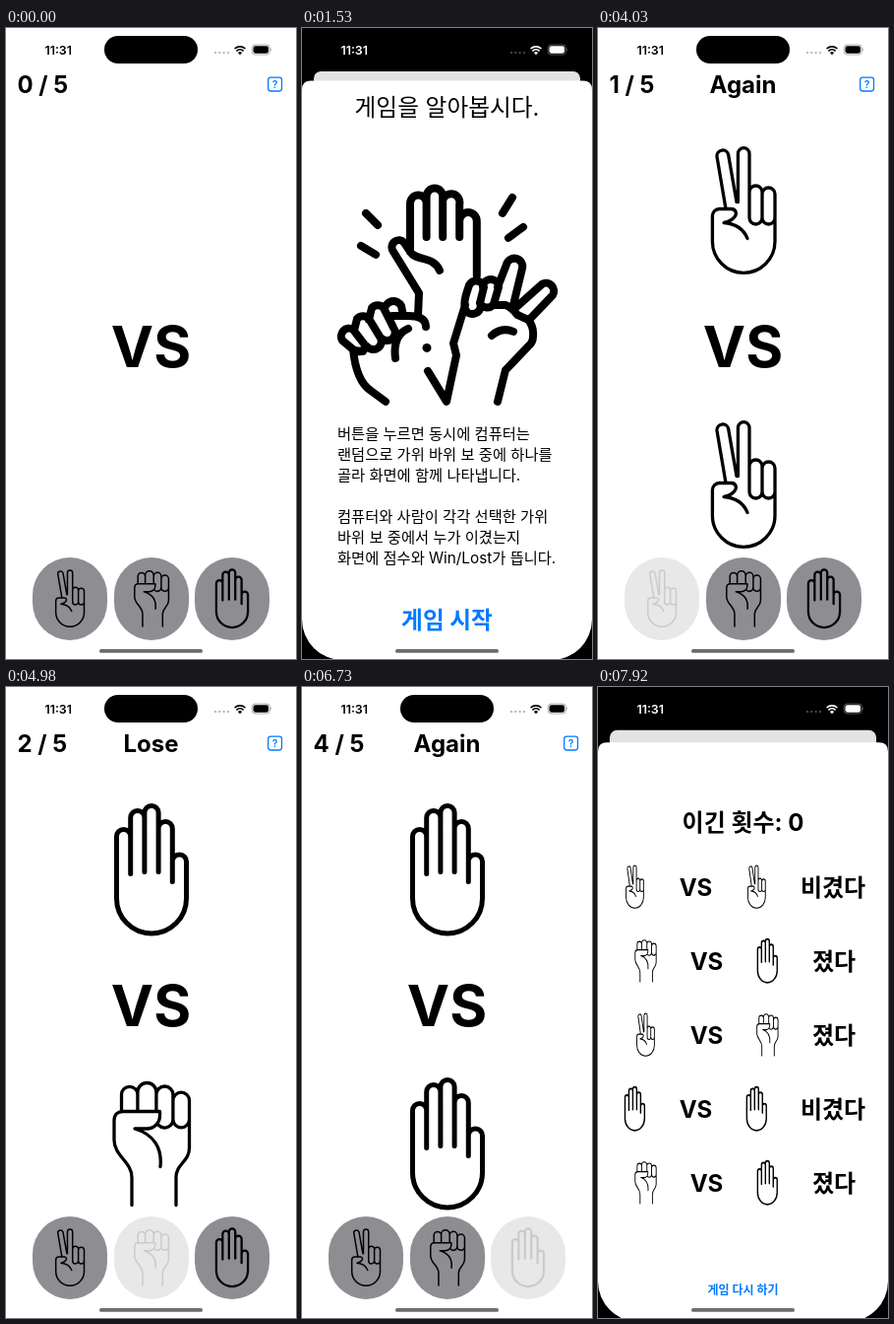
An HTML page for the animation above (8000 ms loop, 295x640 px).

```html
<!DOCTYPE html>
<html lang="ko">
<head>
<meta charset="utf-8">
<title>Rock paper scissors</title>
<style>
html, body { margin: 0; width: 100%; height: 100%; overflow: hidden; background: #000; }
svg { display: block; width: 100%; height: 100%; }
text { font-family: Inter, "Noto Sans CJK KR", "Noto Sans CJK", "Noto Sans CJK JP", sans-serif; white-space: pre; }
.mid { text-anchor: middle; }
.bold { font-weight: 700; }
.big { font-size: 24px; }
.blue { fill: #007aff; }
.line { fill: none; stroke: #000; stroke-linecap: round; stroke-linejoin: round; }
</style>
</head>
<body>
<svg viewBox="0 0 295 640">
  <defs>
    <path id="hand0" class="line" stroke-width="3.3" d="M-5.6-9V-58a5.8 5.8 0 0 1 11.6 0V5
      M-18-2L-27-55a5.9 5.9 0 0 1 11.6-2L-7-9
      M6-19a6.5 6.5 0 0 1 13 0V7a6.5 6.5 0 0 1-13 0z
      M19-17a6.5 6.5 0 0 1 13 0V7a6.5 6.5 0 0 1-13 0
      M32 7V31a31.8 31.8 0 0 1-63.6 0V5a7 7 0 0 1 7-7H-12.5c5 0 6 5 3.5 8-3 4-6 5-11 6c12 1 20 6 24 16"/>
    <path id="hand1" class="line" stroke-width="3.3" d="M-30.5-33V-50a8.2 8.2 0 0 1 16.4 0V-33
      M-14.1-50V-52.5a9.5 9.5 0 0 1 19 0V-33
      M4.9-50a8.5 8.5 0 0 1 17 0V-25a8.5 8.5 0 0 1-14.5 6
      M21.9-44a8.3 8.3 0 0 1 16.6 0V-25a8.3 8.3 0 0 1-16.6 0
      M38.5-25V4c0 14-13.5 16-13.5 30V62
      M-20 62V34c0-16-18-22-18-38V-24c0-6 4-9 9-9H8.5V-29c0 8-6 13.5-13.5 13.5H-17C2-10 11 4 9 23"/>
    <path id="hand2" class="line" stroke-width="5" d="M-21.3 4V-34a7.1 7.1 0 0 0-14.2 0V29a35.5 35.5 0 0 0 71 0V-8.5a7.1 7.1 0 0 0-14.2 0V12
      M-21.3-34V-53a7.1 7.1 0 0 1 14.2 0V2
      M-7.1-53V-58a7.1 7.1 0 0 1 14.2 0V2
      M7.1-42a7.1 7.1 0 0 1 14.2 0V-8"/>
  </defs>

  <g id="game">
    <rect class="page" width="295" height="640" fill="#fff"/>
    <text id="score" class="big bold" x="11.5" y="65.7"></text>
    <text id="verdict" class="big bold mid" x="147.5" y="65.7"></text>
    <g id="help">
      <rect x="266.7" y="50.2" width="13.8" height="13.8" rx="2.4" fill="none" stroke="#007aff" stroke-width="1.3"/>
      <text class="mid blue" x="273.6" y="60.9" font-size="10.5" font-weight="600">?</text>
    </g>
    <use id="cpu" transform="translate(148 185.5)"/>
    <text class="bold mid" x="147.5" y="344.2" font-size="58">VS</text>
    <use id="me" transform="translate(148 463.5)"/>
    <g id="buttons"></g>
    <rect id="dim" class="page" width="295" height="640"/>
  </g>

  <g id="rules">
    <path class="sheet" fill="#fff"/>
    <text class="mid" x="147.5" y="88" font-size="23.7">게임을 알아봅시다.</text>
    <path class="line" stroke-width="8" d="M65 187l12 12M60 220l15 9M214 171l-10 16M225 201l-15 11
      M110 226V177a8.3 8.3 0 0 1 16.6 0V211
      M126.6 177V170a8.3 8.3 0 0 1 16.6 0V211
      M143.2 174a8.5 8.5 0 0 1 17 4V211
      M160.2 195a8.8 8.8 0 0 1 17.6 0V250
      M110 226L104 217a7 7 0 0 0-11 9L119 268L118 291M110 226c6 10 24 4 30 19
      M92 291H108q18 0 18 11M108 304Q92 311 95 334
      M62 327L53 326L41 316A8 8 0 0 1 52 305L65 322A8 8 0 0 1 53 326
      M53 306L56 294A8 8 0 0 1 68 294L79 312A8 8 0 0 1 66 322
      M68 295L71 283A8 8 0 0 1 83 283L93 303A8 8 0 0 1 80 313
      M84 285A9 9 0 0 1 101 281L103 291
      M52 325Q55 357 70 367L85 378
      M128 347L147 378L157 331L154 319L166 280
      M166 284Q164 278 168 266L170 260A8 8 0 0 1 185 262L181 278A8 8 0 0 1 166 284
      M184 262A8 8 0 0 1 200 262L195 279A8 8 0 0 1 181 278
      M199 262L208 239A8 8 0 0 1 224 243L215 280
      M217 283L244 259A8 8 0 0 1 255 270L231 295
      M197 280L207 280Q214 283 219 290M193 311Q203 302 215 307
      M219 290L230 295Q236 302 235 312Q235 318 230 322L207 346L199 378"/>
    <circle cx="127" cy="323.5" r="4.5"/>
    <g id="lines" font-size="15.3"></g>
    <text id="start" class="mid bold blue" x="147.5" y="608" font-size="23.7">게임 시작</text>
  </g>

  <g id="result">
    <path class="sheet" fill="#fff"/>
    <text class="mid bold big" x="147.5" y="142.6">이긴 횟수: 0</text>
    <g id="rows"></g>
    <text class="mid bold blue" x="147.5" y="612.6" font-size="12">게임 다시 하기</text>
  </g>

  <rect x="100" y="8" width="95" height="28" rx="14"/>
  <g id="status">
    <text class="mid" x="53.2" y="26.6" font-size="12.4" font-weight="600">11:31</text>
    <path d="M238 27.2l-2.1-2.2a3 3 0 0 1 4.2 0z"/>
    <path d="M232.6 21a7.7 7.7 0 0 1 10.8 0M234.4 23.3a5.2 5.2 0 0 1 7.2 0" fill="none" stroke-width="1.7"/>
    <rect x="251.5" y="18.3" width="15.6" height="7.4" rx="2.1" stroke="none"/>
    <rect x="250.2" y="17" width="18.2" height="10" rx="3.2" fill="none" stroke-width=".8" opacity=".4"/>
    <path d="M269.4 20.3q1.6 1.7 0 3.4z" opacity=".45"/>
    <path d="M213 25h0m4.3 0h0m4.3 0h0m4.3 0h0" stroke-width="2.5" stroke-linecap="round" opacity=".25"/>
  </g>
  <rect x="95" y="630" width="105" height="3.8" rx="1.9" fill="#6c6c6c"/>
</svg>
<script>
const $ = id => document.getElementById(id);
const LOOP = 8000, SHEET_TOP = 52.5;

// start, end, my hand, computer's hand (0 scissors, 1 rock, 2 paper)
const rounds = [
  [4030, 4450, 0, 0],
  [4980, 5320, 1, 2],
  [6000, 6470, 0, 1],
  [6730, 7160, 2, 2],
  [7510, 7920, 1, 2]
];

// The screen refreshes in bursts: start, end, number of steps
const bursts = [
  [0, 0, 1], [900, 900, 1], [1130, 1530, 5], [3070, 3520, 5], [3740, 3740, 1],
  ...rounds.map(([a, b]) => [a, b, a === 4980 ? 4 : 5])
];

const hand = (kind, x, y, scale) =>
  `<use href="#hand${kind}" transform="translate(${x} ${y}) scale(${scale})"/>`;

$('buttons').innerHTML = [65, 148, 230].map((x, i) =>
  `<g><rect x="${x - 38}" y="537" width="76" height="84" rx="38" fill="#8e8e92"/>${hand(i, x, 578.8, .453)}</g>`
).join('');

$('lines').innerHTML = [
  '버튼을 누르면 동시에 컴퓨터는',
  '랜덤으로 가위 바위 보 중에 하나를',
  '골라 화면에 함께 나타냅니다.',
  '',
  '컴퓨터와 사람이 각각 선택한 가위',
  '바위 보 중에서 누가 이겼는지',
  '화면에 점수와 Win/Lost가 뜹니다.'
].map((s, i) => `<text x="36" y="${416 + 21 * i}">${s}</text>`).join('');

$('rows').innerHTML = rounds.map(([, , me, cpu], i) => {
  const draw = me === cpu, dx = draw ? 0 : 11, y = 199 + 75 * i;
  const icon = (kind, x) => hand(kind, x + dx, y, '.28 .34');
  const label = (x, s) => `<text class="mid bold big" x="${x}" y="${y + 8.7}">${s}</text>`;
  return icon(me, 37.4) + label(99.5 + dx, 'VS') +
    icon(cpu, 161.3) + label(draw ? 239 : 240, draw ? '비겼다' : '졌다');
}).join('');

for (const s of document.querySelectorAll('.sheet'))
  s.setAttribute('d', `M0 ${SHEET_TOP + 9}q0-9 9-9H286q9 0 9 9V599a41 41 0 0 1-41 41H41a41 41 0 0 1-41-41z`);

const clamp = v => Math.min(1, Math.max(0, v));

// Critically damped spring, 0 to 1
function spring(ms) {
  const k = Math.max(0, ms) * .01826;
  return 1 - (1 + k) * Math.exp(-k);
}

function snap(t) {
  const [a, b, n] = bursts.findLast(burst => t >= burst[0]);
  if (n === 1) return a;
  const step = (b - a) / (n - 1);
  for (let i = n - 1; i > 0; i--) {
    const at = Math.round((a + i * step) / 10) * 10;
    if (t >= at) return at;
  }
  return a;
}

function fade(t, a, b) {
  const p = clamp((t - a) / (b - a));
  return .2 + .8 * p * p * (3 - 2 * p);
}

function placeSheet(id, p) {
  $(id).setAttribute('visibility', p > 0 ? 'visible' : 'hidden');
  $(id).setAttribute('transform', `translate(0 ${(1 - p) * (640 - SHEET_TOP)})`);
}

function render(t) {
  const played = rounds.filter(r => t >= r[0]).length;
  const round = rounds[played - 1];
  $('score').textContent = `${played} / 5`;
  $('verdict').textContent = round ? (round[2] === round[3] ? 'Again' : 'Lose') : '';
  $('me').setAttribute('href', round ? '#hand' + round[2] : '');
  $('cpu').setAttribute('href', round ? '#hand' + round[3] : '');
  [...$('buttons').children].forEach((b, i) =>
    b.setAttribute('opacity', round && round[2] === i ? fade(t, round[0], round[1]) : 1));
  $('help').setAttribute('opacity', t < 900 ? 1 : fade(t, 1050, 1480));
  $('start').setAttribute('opacity', t < 3070 ? 1 : fade(t, 3070, 3520));

  const rules = t >= 3740 ? 0 : t > 3100 ? 1 - spring(t - 3100) : spring(t - 1050);
  const result = spring(t - 7530);
  placeSheet('rules', rules);
  placeSheet('result', result);

  const p = Math.max(rules, result);
  $('game').setAttribute('transform', `translate(${12 * p} ${44 * p}) scale(${1 - p * 24 / 295})`);
  for (const r of document.querySelectorAll('.page')) r.setAttribute('rx', p ? 41 - 33 * p : 0);
  $('dim').setAttribute('opacity', .11 * p);
  const v = Math.round(255 * p), ink = `rgb(${v},${v},${v})`;
  $('status').setAttribute('fill', ink);
  for (const s of document.querySelectorAll('#status [stroke-width]')) s.setAttribute('stroke', ink);
}

function tick() {
  render(snap(performance.now() % LOOP));
  requestAnimationFrame(tick);
}
tick();
</script>
</body>
</html>
```
